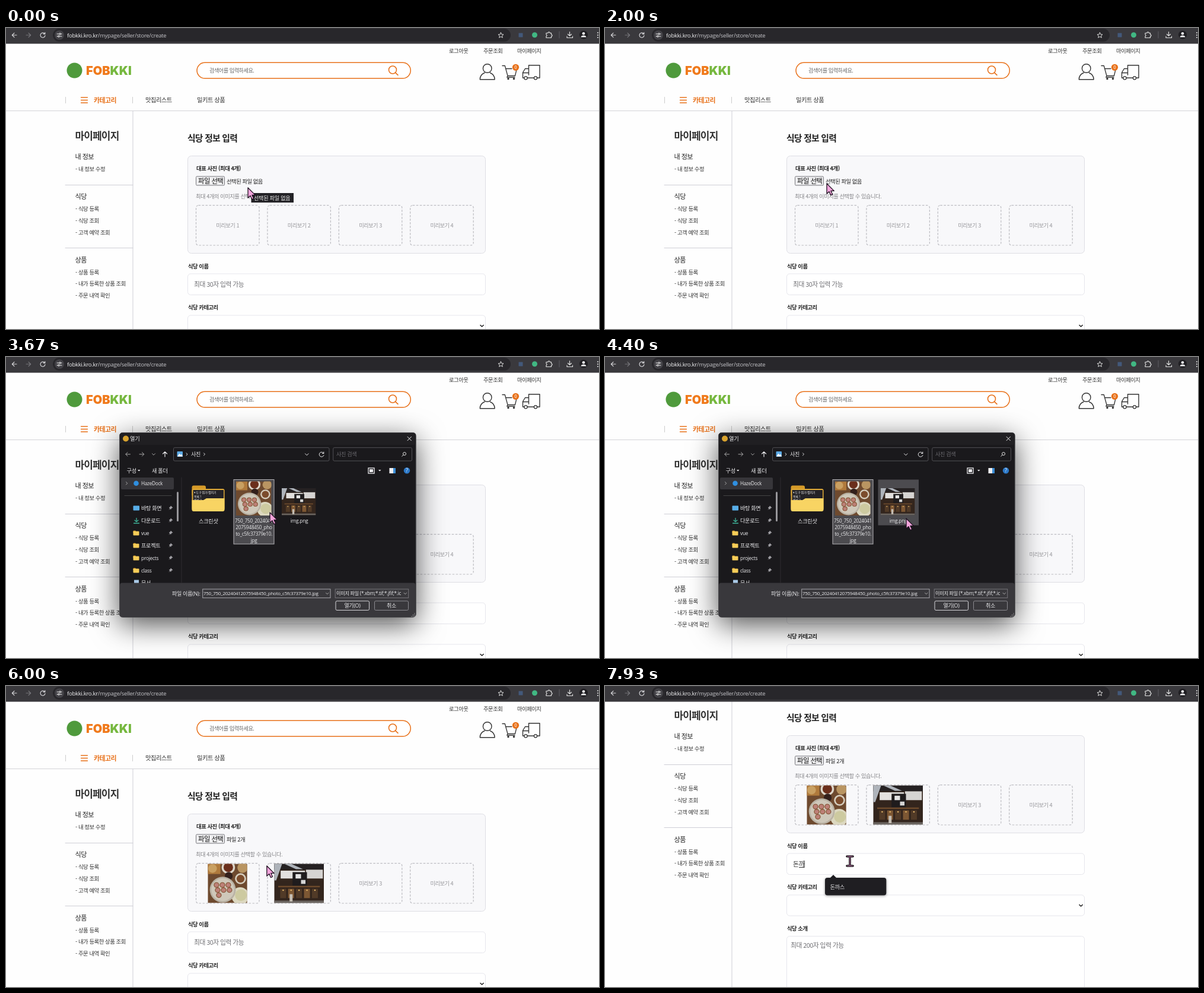
An HTML page for the animation above (8 s loop, 1000 by 507 pixels).

```html
<!DOCTYPE html>
<html lang="ko">
<head>
<meta charset="utf-8">
<title>식당 정보 입력</title>
<style>
html, body { margin: 0; width: 100%; height: 100%; overflow: hidden; background: #fefefe }
svg { display: block; width: 100vw; height: 100vh }
text { font-family: 'Noto Sans CJK KR', 'Noto Sans CJK', sans-serif; letter-spacing: -.05em; white-space: pre }
.ui text { font-family: 'Open Sans', 'Noto Sans CJK KR', sans-serif; letter-spacing: -.03em }
.line { fill: none; stroke-linecap: round; stroke-linejoin: round }
#shadow { filter: drop-shadow(0 12px 24px rgba(0,0,0,.68)) }
</style>
</head>
<body>
<svg id="stage" viewBox="0 0 1000 507" preserveAspectRatio="none"></svg>
<script>
const ORANGE = '#e8711a', INK = '#333';
const LOOP = 8000, FILE = '750_750_20240412075948450_photo_c5fc37379e10.jpg';

// markup helpers; text is placed by its vertical middle
const text = (x, y, s, size = 9.3, fill = INK, more = '') =>
  `<text x="${x}" y="${y + size * .39}" font-size="${size}" fill="${fill}" ${more}>${s}</text>`;
const bold = (x, y, s, size, fill = '#222') => text(x, y, s, size, fill, 'font-weight="700"');
const mid = (x, y, s, size, fill) => text(x, y, s, size, fill, 'text-anchor="middle"');
const rect = (x, y, x2, y2, fill, stroke = 'none', r = 0, more = '') =>
  `<rect x="${x}" y="${y}" width="${x2 - x}" height="${y2 - y}" rx="${r}" fill="${fill}" stroke="${stroke}" ${more}/>`;
const dot = (x, y, r, fill, more = '') => `<circle cx="${x}" cy="${y}" r="${r}" fill="${fill}" ${more}/>`;
const line = (d, stroke, w = 1) => `<path class="line" d="${d}" stroke="${stroke}" stroke-width="${w}"/>`;
const group = (id, s, more = '') => `<g id="${id}" ${more}>${s}</g>`;
const use = (id, x, y, w, h) => `<use href="#${id}" x="${x}" y="${y}" width="${w}" height="${h}"/>`;

const food = () => {
  let s = rect(0, 0, 100, 100, '#6e4a2f') + rect(0, 0, 32, 26, '#b07a3c') + dot(12, 12, 11, '#c9a062') +
    dot(52, 9, 17, '#ddd6ca') + dot(52, 9, 12, '#6b2f1c') + dot(88, 10, 13, '#b99562') +
    dot(53, 31, 10, '#33201c') + dot(83, 38, 14, '#d5cdbd') + dot(83, 38, 10, '#7c4c2c') +
    dot(82, 82, 22, '#dcd8c0') + dot(84, 80, 15, '#cdcaa0') +
    dot(38, 66, 33, '#b9b2a4') + dot(38, 66, 29, '#cfc8ba');
  for (let i = 0; i < 7; i++) {
    const x = 22 + 15 * (i % 3) + 3 * (i / 3 | 0), y = 54 + 13 * (i / 3 | 0);
    s += dot(x, y, 7, '#8a5a3c') + dot(x, y, 5, '#bd8078');
  }
  return s;
};
const shop = () => {
  let s = rect(0, 0, 100, 80, '#33251d') + rect(0, 0, 100, 12, '#252122') +
    '<path d="M0 0H16L4 34H0ZM20 0H34L58 11H44Z" fill="#aeb3ba"/>' +
    rect(13, 14, 62, 30, '#e2e0de') + rect(64, 12, 98, 30, '#d6d4d2') +
    rect(37, 17, 66, 45, '#1f1c1d') + rect(43, 21, 54, 30, '#e4e4e4') + rect(54, 33, 63, 41, '#d4d4d4') +
    rect(8, 45, 92, 48, '#6d4a2c');
  for (let i = 0; i < 5; i++)
    s += rect(12 + i * 16, 51, 24 + i * 16, 70, i % 2 ? '#7d5733' : '#513a27') + dot(18 + i * 16, 54, 1.5, '#e0b468');
  return s + rect(0, 75, 100, 80, '#6a645f') + rect(31, 62, 37, 77, '#c5beb4');
};
const defs = `<defs>
  <symbol id="food" viewBox="0 0 100 100" preserveAspectRatio="none">${food()}</symbol>
  <symbol id="shop" viewBox="0 0 100 80" preserveAspectRatio="none">${shop()}</symbol></defs>`;

const header = () =>
  text(747, 38.5, '로그아웃', 9.3) + text(805, 38.5, '주문조회', 9.3) + text(862, 38.5, '마이페이지', 9.3) +
  dot(115.5, 71.5, 13, '#4f9a3c') +
  `<text x="135" y="79" font-size="20" font-weight="900" style="font-family:Inter,sans-serif;letter-spacing:0"><tspan fill="#f07a1c">FOB</tspan><tspan fill="#76b83f">KKI</tspan></text>` +
  rect(322, 58.3, 682.3, 84.8, '#fff', ORANGE, 13.2, 'stroke-width="1.5"') +
  text(343, 71.5, '검색어를 입력하세요.', 9.1, '#666') +
  dot(652, 70.5, 6.5, 'none', `stroke="${ORANGE}" stroke-width="1.6"`) + line('M656.8 75.3L661 79.3', ORANGE, 1.6) +
  dot(811.7, 68, 7.3, 'none', `stroke="${INK}" stroke-width="1.4"`) +
  line('M807 75.5C802 77.5 799.3 81 799.3 86.7H824.1C824.1 81 821.4 77.5 816.4 75.5', INK, 1.4) +
  line('M837 63.5H841.3L846 80.5H858.5L861 70M843 68.5H853M846 80.5L844.8 83H858', INK, 1.3) +
  dot(847, 85.5, 1.7, INK) + dot(856.5, 85.5, 1.7, INK) +
  dot(859.5, 66.3, 5.6, ORANGE) + mid(859.3, 66.2, '0', 8, '#fff') +
  line('M874 84H871.5V75L875.5 68.5H881.5M881.5 79V62.7H900V84H895.5M879 84H890.5M871.5 75.5H881.5', INK, 1.4) +
  dot(876.5, 84.3, 2.6, '#fff', `stroke="${INK}" stroke-width="1.3"`) + dot(893, 84.3, 2.6, '#fff', `stroke="${INK}" stroke-width="1.3"`) +
  line('M100.5 116.5V126.5M213.5 116.5V126.5', '#ccc') +
  line('M126.5 117H137.5M126.5 121.5H137.5M126.5 126H137.5', ORANGE, 1.3) +
  bold(148, 121.3, '카테고리', 10.9, ORANGE) + text(235, 121.3, '맛집리스트', 10.3) + text(322, 121.3, '밀키트 상품', 10.3) +
  line('M0 139.5H1000', '#d4d4d8');

const sidebar = () => {
  const menu = [[217, '내 정보', '내 정보 수정'], [284, '식당', '식당 등록', '식당 조회', '고객 예약 조회'],
    [390.5, '상품', '상품 등록', '내가 등록한 상품 조회', '주문 내역 확인']];
  return line('M214 140V660', '#cfcfd6') + line('M100 264.5H214M100 370.5H214', '#cfcfd6') +
    bold(116.5, 181, '마이페이지', 17, INK) +
    menu.map(([y, head, ...items]) => text(116.5, y, head, 11.1, '#222') +
      items.map((s, i) => text(117, y + 20.5 + i * 19.8, '- ' + s, 9.4)).join('')).join('');
};

const form = () =>
  bold(306, 185.5, '식당 정보 입력', 14.8) +
  rect(306.5, 215.5, 808.5, 379.5, '#f8f8fa', '#dedee4', 6) +
  bold(321, 236.5, '대표 사진 (최대 4개)', 9.4) +
  rect(320.5, 250, 368.5, 265, '#efeff1', '#77777c', 1.5) + text(324, 257.3, '파일 선택', 11.4, '#111') +
  `<text id="chosen" x="372" y="261.6" font-size="9.3" fill="#222"></text>` +
  text(320, 283.5, '최대 4개의 이미지를 선택할 수 있습니다.', 9.25, '#858589') +
  [0, 1, 2, 3].map(i => rect(320.5 + i * 120.4, 298.7, 427 + i * 120.4, 366, 'none', '#bdbdc2', 4, 'stroke-width="1.2" stroke-dasharray="3.6 2.4"') +
    group('slot' + i, mid(373.7 + i * 120.4, 332, '미리보기 ' + (i + 1), 9.2, '#96969a'))).join('') +
  group('previews', use('food', 340.3, 299.5, 66.5, 66) + use('shop', 452.3, 299.5, 83.7, 66)) +
  bold(307, 401, '식당 이름', 9.3) + rect(306.5, 414, 808.5, 449.5, '#fff', '#e6e6ec', 5) +
  group('hint', text(317, 432, '최대 30자 입력 가능', 10.8, '#6f6f73')) +
  `<text id="typed" x="317" y="436" font-size="10.9" fill="#333"></text>` + '<path id="compose" stroke="#333" stroke-width="1" fill="none"/>' +
  bold(307, 470.5, '식당 카테고리', 9.3) + rect(306.5, 484, 808.5, 519, '#fff', '#e6e6ec', 5) +
  line('M800 500.5L802.6 503L805.2 500.5', '#222', 1.6) +
  bold(307, 540, '식당 소개', 9.3) + rect(306.5, 553.5, 808.5, 680, '#fff', '#e6e6ec', 5) +
  text(313, 569, '최대 200자 입력 가능', 10.8, '#6f6f73');

const toolbar = () =>
  rect(0, 0, 1000, 26.5, '#3a393d') + rect(79, 1, 851, 23, '#28272b', 'none', 11) +
  line('M18 12H10.5M14 8.3L10.3 12L14 15.7', '#d5d5d8', 1.2) + line('M34 12H41.5M38 8.3L41.7 12L38 15.7', '#77777b', 1.2) +
  line('M65.3 9.8A4 4 0 1 0 66 12.5M65.8 7.5V10.2H63', '#d5d5d8', 1.2) +
  dot(90, 12, 8, '#424146') + line('M86 10H89M92.5 10H94M86 14H87.5M91 14H94', '#eee') +
  dot(91, 10, 1.3, 'none', 'stroke="#eee"') + dot(89, 14, 1.3, 'none', 'stroke="#eee"') +
  text(103, 12, 'fobkki.kro.kr<tspan fill="#c4c4c8">/mypage/seller/store/create</tspan>', 9.5, '#f2f2f4') +
  line('M834.5 7.7L835.8 10.7L839 11L836.6 13.1L837.3 16.3L834.5 14.6L831.7 16.3L832.4 13.1L830 11L833.2 10.7Z', '#ddd') +
  rect(864.5, 8.5, 871.5, 15.5, '#43597a') + dot(891.5, 11.7, 4.5, '#41b883') +
  line('M911 8.5H914A1.6 1.6 0 0 1 917.2 8.5H919.5V11A1.6 1.6 0 0 1 919.5 14.2V16.5H911V14A1.6 1.6 0 0 0 911 11Z', '#ddd', 1.2) +
  line('M933 6V17', '#5f5f64') + line('M950.5 6.5V13M947.5 10.5L950.5 13.3L953.5 10.5M946 14V16.5H955.5V14', '#ddd', 1.2) +
  dot(974, 11.5, 7, '#1f1e22') + dot(974, 9.3, 2.3, '#f4f4f6') + '<path d="M969.5 15.5C969.5 11.6 978.5 11.6 978.5 15.5Z" fill="#f4f4f6"/>' +
  [8, 12, 16].map(y => dot(998, y, 1.1, '#ddd')).join('');

const dialog = () => {
  const W = '#ececee', folder = (x, y) => rect(x, y - 4, x + 4.5, y, '#d99f2b', 'none', 1) + rect(x, y - 3, x + 10, y + 4, '#f6cd58', 'none', 1);
  const places = ['바탕 화면', '다운로드', 'vue', '프로젝트', 'projects', 'class', '문서'];
  return rect(191.5, 127.5, 691.2, 438.2, '#1a191c', '#4b4a4e', 5, 'id="shadow"') +
    rect(192, 128, 691, 148, '#201f22', 'none', 4) +
    dot(202, 137.5, 5, '#d9a32e', 'id="badge"') + `<text id="caption" x="209" y="140.8" font-size="9.2" fill="${W}">열기</text>` +
    line('M677 134.3L683.5 140.8M683.5 134.3L677 140.8', W) +
    line('M209.5 163.8H202M205 160.5L201.8 163.8L205 167M225 163.8H232.5M229.5 160.5L232.7 163.8L229.5 167', '#aaa') +
    line('M246.5 162.7L249 165.2L251.5 162.7', '#aaa') + line('M268 168V160M264.5 163L268 159.7L271.5 163', W, 1.2) +
    rect(282.5, 152.7, 545, 175, '#1a191c', '#535257', 2) + rect(551.7, 152.7, 684.5, 175, '#1a191c', '#535257', 2) +
    rect(288.5, 159, 298, 168, '#5aa9e6', 'none', 1) + '<path d="M289 167.5L292.5 162.5L294.5 165L296 163.5L298 167.5Z" fill="#fff"/>' +
    line('M304 161.8L306 163.8L304 165.8', W) + text(312, 163.8, '사진', 9, W) + group('crumb', line('M333.5 161.8L335.5 163.8L333.5 165.8', W)) +
    line('M504.5 162.8L507.3 165.6L510 162.8M535.6 162A4 4 0 1 0 536 165.5M535.8 160V162.5H533.3', W) +
    text(557, 163.8, '사진 검색', 9.1, '#6c6b70') + dot(672, 163, 2.5, 'none', 'stroke="#ddd"') + line('M670 165L667.7 167.3', '#ddd') +
    text(203.5, 191.2, '구성', 9.2, W) + `<path d="M222 190H226.5L224.2 192.5ZM628 190H632.5L630.2 192.5Z" fill="${W}"/>` +
    text(246, 191.2, '새 폴더', 9.2, W) +
    rect(611, 187, 621, 196, '#1a191c', W, 0, 'stroke-width="1.3"') + rect(613, 189, 619, 194, W) +
    rect(646.5, 187, 657, 196, '#f0f0f2') + rect(653, 187, 657, 196, '#3d8fd8') +
    dot(676, 191.3, 5.2, '#2b78c8') + mid(676, 191, '?', 8.5, '#fff') +
    rect(194, 203, 283, 223, '#37363a', 'none', 2) + line('M202.5 210.5L204.7 212.7L202.5 215', '#aaa') +
    dot(219.5, 212.8, 4.3, '#2f8fe0') + text(228, 212.5, 'HazeDock', 8.2, W) +
    line('M200 233.5H279', '#444') + rect(288, 227, 291, 277, '#98979b', 'none', 1.5) + line('M296 203V380', '#2e2d31') +
    places.map((s, i) => {
      const y = 254.5 + i * 21;
      const icon = i == 0 ? rect(214.5, y - 4, 225, y + 4, '#58aee8', 'none', 1)
        : i == 1 ? line(`M220 ${y - 4}V${y + 2}M217 ${y - .5}L220 ${y + 2}L223 ${y - .5}M215.5 ${y + 4.5}H224.5`, '#3fb59a', 1.3)
        : i == 6 ? rect(216, y - 5, 224, y + 5, '#a9c9e6') : folder(214.5, y);
      const pin = i < 6 ? `<path d="M278 ${y - 4}L281.5 ${y - .5}L279.5 ${y}L277.8 ${y + 2.5}L276.6 ${y + 1}L274.5 ${y + 3.5}L276 ${y + .3}L274.8 ${y - 1}L277 ${y - 2.3}Z" fill="#a09fa4"/>` : '';
      return icon + text(228, y, s, /[a-z]/.test(s) ? 8.4 : 9.1, W) + pin;
    }).join('') +
    rect(313.5, 216.5, 337, 235, '#d59a28', 'none', 3) + rect(313.5, 222, 368.5, 258, '#e2ac38', 'none', 3) +
    rect(315.5, 224, 367, 248, '#242327') + text(317, 228.5, '▾ 도구 접기/펼치기', 5, '#eee') + text(317, 235, '목록 1', 5, '#eee') + text(317, 241, '목록 2', 5, '#eee') +
    '<path d="M313.5 241H333L338 238H368.5V257Q368.5 260 365.5 260H316.5Q313.5 260 313.5 257Z" fill="#f8d463"/>' +
    mid(341.3, 276, '스크린샷', 9.1, W) +
    rect(384, 206.5, 452, 315, '#4c4b4f', 'none', 0, 'id="item0"') + rect(460.5, 206.5, 529, 283.5, '#4c4b4f', 'none', 0, 'id="item1"') +
    use('food', 388, 209.5, 59.5, 57.5) + use('shop', 465, 221, 57.5, 45.5) +
    ['750_750_2024041', '2075948450_pho', 'to_c5fc37379e10.', 'jpg'].map((s, i) => mid(418, 276 + i * 10.9, s, 8.1, W)).join('') +
    mid(494.5, 276, 'img.png', 8.3, W) +
    rect(192, 380.5, 690.7, 437.8, '#39383c', 'none', 4) +
    text(280, 398, '파일 이름(N):', 9, W) + rect(331.7, 391, 547, 405.7, '#39383c', '#a9a8ad') +
    rect(332.5, 392, 535, 404.7, '#1677d0', 'none', 0, 'id="marked"') + text(333, 398, FILE, 7.95, W, 'id="name"') +
    group('nameCaret', line('M334 393.5V403.5', W)) + line('M539.5 397.3L541.7 399.5L544 397.3M671 397.3L673.2 399.5L675.5 397.3', '#bbb', .9) +
    rect(555.2, 391, 678.7, 405.7, 'none', '#77767b') + text(557, 398, '이미지 파일 (*.xbm;*.tif;*.jfif;*.ic', 8.1, W) +
    rect(556, 411, 612.5, 426.5, '#39383c', '#d5d4d8', 2, 'id="open"') + mid(584, 418.7, '열기(O)', 8.9, W) +
    rect(621.5, 411, 678.5, 426.5, '#39383c', '#8c8b90', 2) + mid(650, 418.7, '취소', 9, W) +
    [[689, 432], [686.5, 434.5], [689, 434.5], [684, 437], [686.5, 437], [689, 437]].map(([x, y]) => dot(x, y, .7, '#aaa')).join('');
};

const overlays =
  group('popup', '<path d="M379 324L385 318L391 324Z" fill="#1f1e22"/>' +
    rect(371, 323, 474.3, 352.5, '#1f1e22', 'none', 4, 'style="filter:drop-shadow(0 1px 2px rgba(0,0,0,.4))"') + text(379.5, 338, '돈까스', 9.3, '#e4e4e6')) +
  group('tip', rect(413.5, 278, 485, 294, '#232226') + text(418, 286, '선택된 파일 없음', 9, '#eee', 'style="letter-spacing:-.02em"'));

const pointer =
  group('arrow', '<path d="M0 0V17.2L4 13.6L6.7 19.6L9.7 18.3L7 12.4H12.3Z" fill="#f3a5dc" stroke="#1d1020" stroke-width="1.3" stroke-linejoin="round"/>') +
  group('beam', line('M-5 -8H5M0 -8V8M-5 8H5', '#111', 3.6) + line('M-4.5 -8H4.5M0 -7V7M-4.5 8H4.5', '#e58acb', .9));

stage.innerHTML = defs + group('page', rect(0, 0, 1000, 700, '#fefefe') + header() + sidebar() + form()) +
  group('dlg', dialog(), 'class="ui"') + overlays + group('bar', toolbar(), 'class="ui"') + group('cursor', pointer);

const $ = id => document.getElementById(id);
const show = (id, on) => $(id).style.display = on ? '' : 'none';
const ramp = (t, a, b) => Math.min(1, Math.max(0, (t - a) / (b - a)));
const smooth = p => p * p * (3 - 2 * p);

// start, end, x, y of each pointer move
const moves = [[500, 1200, 374, 262], [2350, 2900, 445, 262], [3750, 4300, 508, 272],
  [4700, 5200, 588, 422.5], [5560, 6080, 430, 295], [6950, 7300, 413, 295]];
const strokes = [[7250, 'ㄷ'], [7350, '도'], [7480, '돈'], [7640, '돈ㄲ'], [7790, '돈까']];

function draw(t) {
  let x = 408, y = 269;
  for (const [a, b, nx, ny] of moves) {
    const p = smooth(ramp(t, a, b));
    x += (nx - x) * p;
    y += (ny - y) * p;
  }
  const scroll = 132 * smooth(ramp(t, 6130, 6480));
  const beam = t > 5340 && x > 306 && x < 809 && Math.abs(y + scroll - 432) < 18;
  $('cursor').setAttribute('transform', `translate(${x} ${y})`);
  show('arrow', !beam);
  show('beam', beam);
  $('page').setAttribute('transform', `translate(0 ${-scroll})`);
  show('tip', t < 600);

  const opening = ramp(t, 2800, 3080), closing = ramp(t, 5330, 5485);
  const scale = 1 - .05 * (1 - opening) ** 2 - .05 * closing;
  show('dlg', opening > 0 && closing < 1);
  $('dlg').setAttribute('opacity', Math.min(1, opening * 2) * (1 - closing));
  $('dlg').setAttribute('transform', `translate(441 282.8) scale(${scale}) translate(-441 -282.8)`);
  const first = t >= 3500, both = t >= 4600;
  const over = (a, b, c, d) => x > a && x < c && y > b && y < d;
  show('item0', first || over(384, 206, 452, 315));
  show('item1', both || over(460, 206, 529, 283));
  $('item0').setAttribute('stroke', first && !both ? '#b5b4b8' : 'none');
  show('name', first);
  show('nameCaret', !first);
  show('marked', both);
  show('crumb', t > 3060);
  show('badge', !closing);
  $('caption').setAttribute('x', closing ? 196 : 209);
  $('open').setAttribute('fill', over(556, 411, 612, 427) ? '#77767b' : '#39383c');

  const loaded = t >= 5560;
  $('chosen').textContent = loaded ? '파일 2개' : '선택된 파일 없음';
  show('previews', loaded);
  show('slot0', !loaded);
  show('slot1', !loaded);

  const word = strokes.reduce((w, [at, s]) => t >= at ? s : w, '');
  const end = 317.3 + 9.5 * word.length;
  $('typed').textContent = word;
  show('hint', !word);
  $('compose').setAttribute('d', word ? `M${end - 9.3} 437.5H${end}M${end} 426V437.5` : t > 7150 ? 'M317 426V437.5' : '');
  show('popup', t >= 7350);
}

function tick() {
  draw(performance.now() % LOOP);
  requestAnimationFrame(tick);
}
tick();
</script>
</body>
</html>
```
